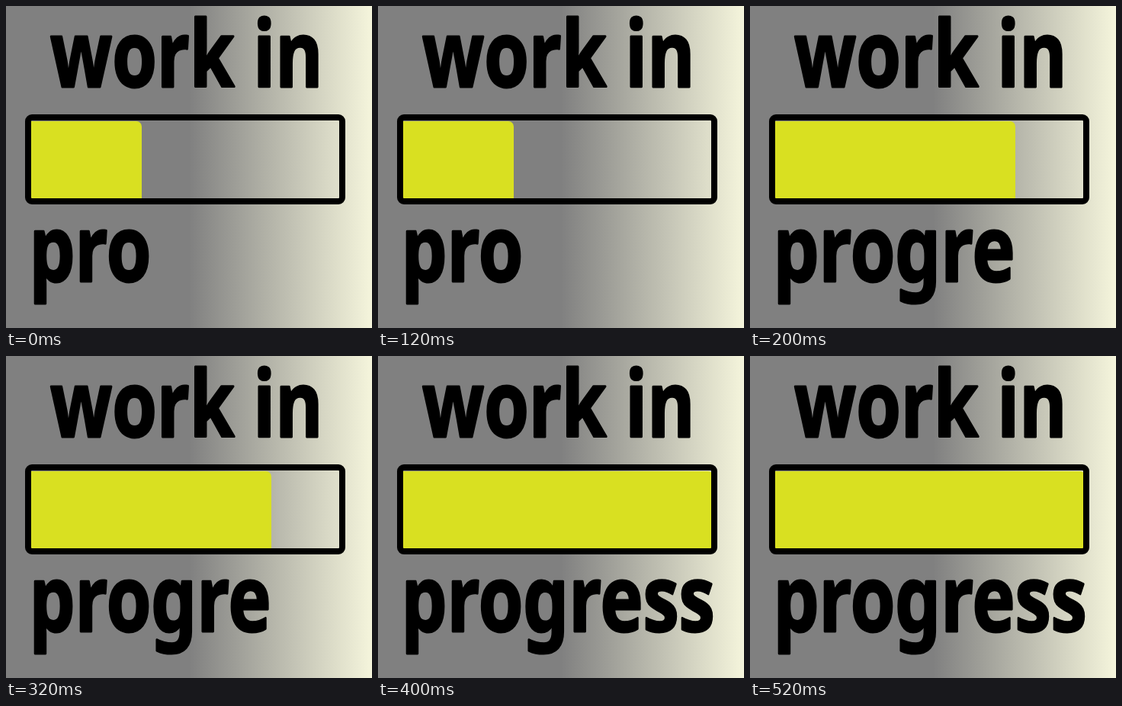
Recreate the animation shown at these times as an HTML page. Size 480 px wide and 422 px high, loop 0.6 s.

```html
<!DOCTYPE html>
<html lang="en">
<head>
<meta charset="utf-8">
<title>Work in progress</title>
<style>
  html, body { margin: 0; width: 100%; height: 100%; overflow: hidden; }
  body { background: linear-gradient(90deg, #808080 50%, #f5f5dc); }
  svg { display: block; width: 480px; height: 422px; }
  /* One condensed, heavy look for all lettering */
  text {
    font: 700 120px "Noto Sans", "Open Sans", sans-serif;
    stroke: #000;
    stroke-width: 3px;
    stroke-linejoin: round;
    transform: scaleX(.79);
  }
</style>
</head>
<body>
<svg viewBox="0 0 480 422">
  <g transform="translate(58 105.5)"><text>work in</text></g>
  <path id="fill" fill="#d9e021"/>
  <rect x="29" y="146" width="412" height="110" rx="5" fill="none" stroke="#000" stroke-width="8"/>
  <g transform="translate(30.5 360.5)"><text id="word"></text></g>
</svg>
<script>
  const STEP = 200;
  const steps = [
    { right: 178, text: "pro" },
    { right: 348, text: "progre" },
    { right: 440, text: "progress" }
  ];
  const fill = document.getElementById("fill");
  const word = document.getElementById("word");
  const start = performance.now();
  let shown = -1;

  function draw(now) {
    const i = Math.floor(Math.max(0, now - start) / STEP) % steps.length;
    if (i !== shown) {
      const { right, text } = steps[i];
      fill.setAttribute("d", `M33 151H${right - 7}a7 7 0 0 1 7 7V252H33Z`);
      word.textContent = text;
      shown = i;
    }
    requestAnimationFrame(draw);
  }
  draw(start);
</script>
</body>
</html>
```
